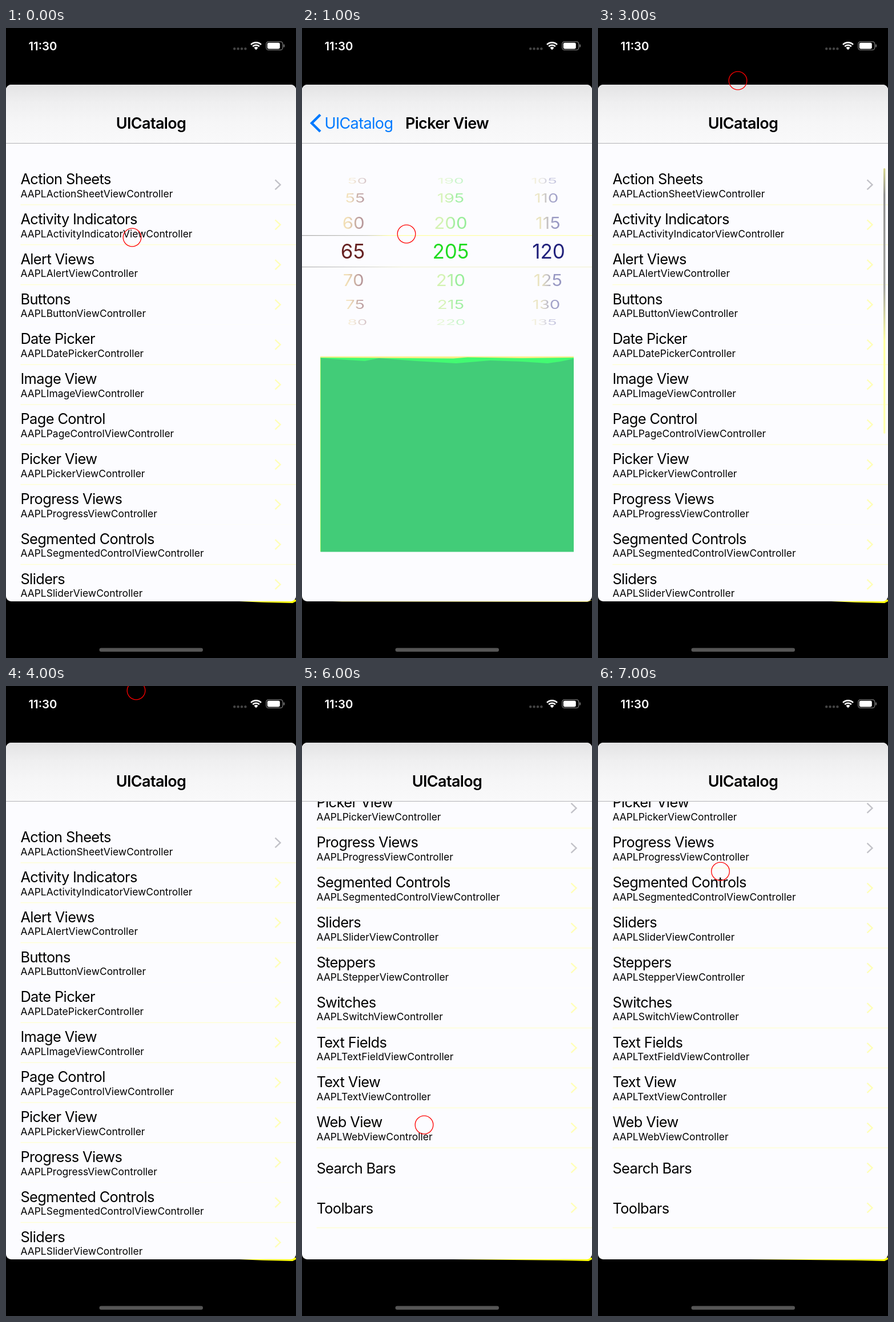
These frames come from a looping animation (508x1101 px, 8000 ms). An HTML page with a canvas:

```html
<!DOCTYPE html>
<html lang="en">
<head>
<meta charset="utf-8">
<title>UICatalog</title>
<style>
html, body { margin: 0; width: 100%; height: 100%; overflow: hidden; background: #000; }
canvas { display: block; width: 508px; height: 1101px; }
</style>
</head>
<body>
<canvas id="stage"></canvas>
<script>
const W = 508, H = 1101, STEP = 1000;
const CARD = { top: 99, bottom: 1002, nav: 201 };
const ROW = 69.85, FIRST = 239;
const FONT = 'Inter, Roboto, sans-serif';
const PAPER = '#fcfcff', YELLOW = '#ffffb8', BLUE = '#007aff';

const canvas = document.getElementById('stage');
const ratio = window.devicePixelRatio || 1;
canvas.width = W * ratio;
canvas.height = H * ratio;
const ctx = canvas.getContext('2d');

const rows = [
  ['Action Sheets', 'ActionSheetView'],
  ['Activity Indicators', 'ActivityIndicatorView'],
  ['Alert Views', 'AlertView'],
  ['Buttons', 'ButtonView'],
  ['Date Picker', 'DatePicker'],
  ['Image View', 'ImageView'],
  ['Page Control', 'PageControlView'],
  ['Picker View', 'PickerView'],
  ['Progress Views', 'ProgressView'],
  ['Segmented Controls', 'SegmentedControlView'],
  ['Sliders', 'SliderView'],
  ['Steppers', 'StepperView'],
  ['Switches', 'SwitchView'],
  ['Text Fields', 'TextFieldView'],
  ['Text View', 'TextView'],
  ['Web View', 'WebView'],
  ['Search Bars'],
  ['Toolbars']
];

// One entry per second: screen, touch point, list scroll, scroll bar, start of the bottom edge tint
const steps = [
  { draw: drawList, touch: [221, 366], edge: 385 },
  { draw: drawPicker, touch: [183, 360], edge: null },
  { draw: drawList, touch: [87, 193], bar: true, edge: 385 },
  { draw: drawList, touch: [245, 92], bar: true, edge: 385 },
  { draw: drawList, touch: [228, 8], edge: 385 },
  { draw: drawList, touch: [214, 6], edge: 385 },
  { draw: drawList, touch: [214, 767], scroll: 549.5, edge: 160 },
  { draw: drawList, touch: [214.5, 324], scroll: 549.5, edge: 160 }
];

function text(str, x, y, size, { color = '#000', weight = 400, spacing = 0, align = 'left' } = {}) {
  ctx.font = `${weight} ${size}px ${FONT}`;
  ctx.letterSpacing = spacing + 'px';
  ctx.textAlign = align;
  ctx.fillStyle = color;
  ctx.fillText(str, x, y);
}

function pill(x, y, w, h, r, color) {
  ctx.fillStyle = color;
  ctx.beginPath();
  ctx.roundRect(x, y, w, h, r);
  ctx.fill();
}

function path(points, closed) {
  ctx.beginPath();
  points.forEach(([x, y]) => ctx.lineTo(x, y));
  if (closed) ctx.closePath();
}

function polygon(points, color) {
  path(points, true);
  ctx.fillStyle = color;
  ctx.fill();
}

function polyline(points, color, width) {
  path(points);
  ctx.strokeStyle = color;
  ctx.lineWidth = width;
  ctx.stroke();
}

function gradient(x0, y0, x1, y1, ...stops) {
  const g = ctx.createLinearGradient(x0, y0, x1, y1);
  stops.forEach(([at, color]) => g.addColorStop(at, color));
  return g;
}

function drawStatus() {
  text('11:30', 39.5, 38.5, 20.3, { color: '#fff', weight: 600 });
  for (let i = 0; i < 4; i++) pill(398 + i * 6.4, 34, 4.4, 4.4, 2.2, '#444');

  ctx.strokeStyle = '#fff';
  ctx.lineWidth = 2.7;
  for (const r of [12.6, 8.2]) {
    ctx.beginPath();
    ctx.arc(438, 38, r, -Math.PI * 0.75, -Math.PI * 0.25);
    ctx.stroke();
  }
  ctx.fillStyle = '#fff';
  ctx.beginPath();
  ctx.moveTo(438, 38.3);
  ctx.arc(438, 38, 5, -Math.PI * 0.75, -Math.PI * 0.25);
  ctx.fill();

  ctx.strokeStyle = '#777';
  ctx.lineWidth = 1.3;
  ctx.beginPath();
  ctx.roundRect(455.8, 23.8, 29, 14.6, 4.2);
  ctx.stroke();
  pill(457.8, 25.8, 22, 10.6, 2.4, '#fff');
  pill(486.2, 28.6, 1.8, 5, 1, '#777');
}

function drawNav(title, back) {
  ctx.fillStyle = gradient(0, CARD.top, 0, CARD.nav,
    [0, '#e3e3e4'], [0.3, '#efeff0'], [0.65, '#f6f6f7'], [1, '#f9f9fa']);
  ctx.fillRect(0, CARD.top, W, CARD.nav - CARD.top);
  ctx.fillStyle = '#b4b4b6';
  ctx.fillRect(0, CARD.nav, W, 1);
  text(title, 254, 175.5, 27, { weight: 600, spacing: -0.65, align: 'center' });
  if (!back) return;
  polyline([[32, 151.5], [17, 166.3], [32, 181]], BLUE, 4.4);
  text(back, 39.5, 175.5, 27, { color: BLUE, spacing: -0.65 });
}

function drawRow([title, name], top) {
  const middle = top + ROW / 2, bottom = top + ROW;
  text(title, 25.4, name ? top + 34 : middle + 10, 25.4, { spacing: -0.6 });
  if (name) text(`AAPL${name}Controller`, 25.4, top + 56.7, 17.46);

  const chevron = middle < 290 ? '#c2c2c8' : YELLOW;
  polyline([[471.5, middle - 8.5], [480.5, middle], [471.5, middle + 8.5]], chevron, 2.4);

  const faint = (bottom > 515 && bottom < 530) || (bottom > 865 && bottom < 880);
  ctx.fillStyle = faint ? '#fdfdfa' : '#ffffd0';
  ctx.fillRect(25.4, bottom - 0.6, W - 25.4, 1.3);
}

function drawList({ scroll = 0, bar }) {
  rows.forEach((row, i) => {
    const top = FIRST + i * ROW - scroll;
    if (top > 100 && top < CARD.bottom) drawRow(row, top);
  });
  if (bar) {
    const shade = gradient(0, 245, 0, 709,
      [0, '#d8d890'], [0.1, '#909090'], [0.45, '#a4a4a0'], [0.65, '#ffffa0'], [1, '#ffffb0']);
    pill(500, 245, 3.4, 464, 1.7, shade);
  }
  drawNav('UICatalog');
}

// Wheel rows by distance from the selection
const wheel = [
  { dy: 0, sx: 1, sy: 1, shift: 0, alpha: 1 },
  { dy: 50, sx: 0.89, sy: 0.82, shift: 1.2, alpha: 0.46 },
  { dy: 93, sx: 0.84, sy: 0.62, shift: 4, alpha: 0.42 },
  { dy: 123.5, sx: 0.8, sy: 0.37, shift: 8, alpha: 0.24 }
];

function drawWheel(x, value, color, lean, tint) {
  for (let k = -3; k <= 3; k++) {
    const { dy, sx, sy, shift, alpha } = wheel[Math.abs(k)];
    ctx.save();
    ctx.translate(x + lean * shift, 390.5 + Math.sign(k) * dy);
    ctx.scale(sx, sy);
    ctx.globalAlpha = alpha;
    const fill = k ? gradient(-30, 0, 30, 0, [0, tint], [0.3, tint], [0.7, color], [1, color]) : color;
    text(value + k * 5, 0, 12.7, 35, { color: fill, align: 'center' });
    ctx.restore();
  }
}

function drawPicker() {
  drawWheel(89, 65, '#672222', 1, '#e6bd60');
  drawWheel(260.5, 205, '#22dc22', 0, '#a4e858');
  drawWheel(432, 120, '#22227c', -1, '#d5c878');

  const line = gradient(0, 0, W, 0, [0, '#a8a8a8'], [0.22, '#c8c8c0'], [0.3, '#ffff9c'], [1, '#ffffa8']);
  ctx.fillStyle = line;
  ctx.fillRect(0, 362, W, 1.2);
  ctx.fillStyle = gradient(0, 0, W, 0, [0, '#b0b0b0'], [0.22, '#d4d4d0'], [0.35, '#f2f2d4'], [1, '#f2f2d4']);
  ctx.fillRect(0, 417, W, 1.2);

  ctx.fillStyle = '#42cc78';
  ctx.fillRect(32.5, 575, 443.5, 340.5);
  polygon([[32, 575], [476, 575], [476, 578], [452, 583], [430, 586], [385, 583], [330, 581],
    [270, 586], [200, 582], [135, 577], [110, 582], [32, 577]], '#42fa72');
  polygon([[32, 574], [476, 574], [476, 576], [385, 577], [290, 575.5], [265, 577.5], [32, 576]], '#ffee88');
  ctx.fillStyle = '#8cf05a';
  ctx.fillRect(32, 577, 1, 338);
  drawNav('Picker View', 'UICatalog');
}

function drawCard(step) {
  if (step.edge) polygon([[step.edge, 1001], [508, 999], [508, 1002], [502, 1005], [450, 1003.8]], '#ffff00');
  else polygon([[20, 1001], [508, 1000], [500, 1003], [70, 1002.6]], '#d8cc50');

  ctx.save();
  ctx.beginPath();
  ctx.roundRect(0, CARD.top, W, CARD.bottom - CARD.top, 9);
  ctx.clip();
  ctx.fillStyle = PAPER;
  ctx.fillRect(0, CARD.top, W, CARD.bottom - CARD.top);
  step.draw(step);
  ctx.restore();
}

function drawTouch([x, y]) {
  ctx.strokeStyle = '#f00';
  ctx.lineWidth = 1.3;
  ctx.beginPath();
  ctx.arc(x, y, 15.8, 0, Math.PI * 2);
  ctx.stroke();
}

function render(time) {
  const step = steps[Math.floor(time / STEP) % steps.length];
  ctx.setTransform(ratio, 0, 0, ratio, 0, 0);
  ctx.fillStyle = '#000';
  ctx.fillRect(0, 0, W, H);
  drawStatus();
  drawCard(step);
  pill(163.5, 1083.5, 181.5, 6.6, 3.3, '#555');
  drawTouch(step.touch);
}

const start = performance.now();
function tick() {
  render(performance.now() - start);
  requestAnimationFrame(tick);
}
tick();
</script>
</body>
</html>
```
